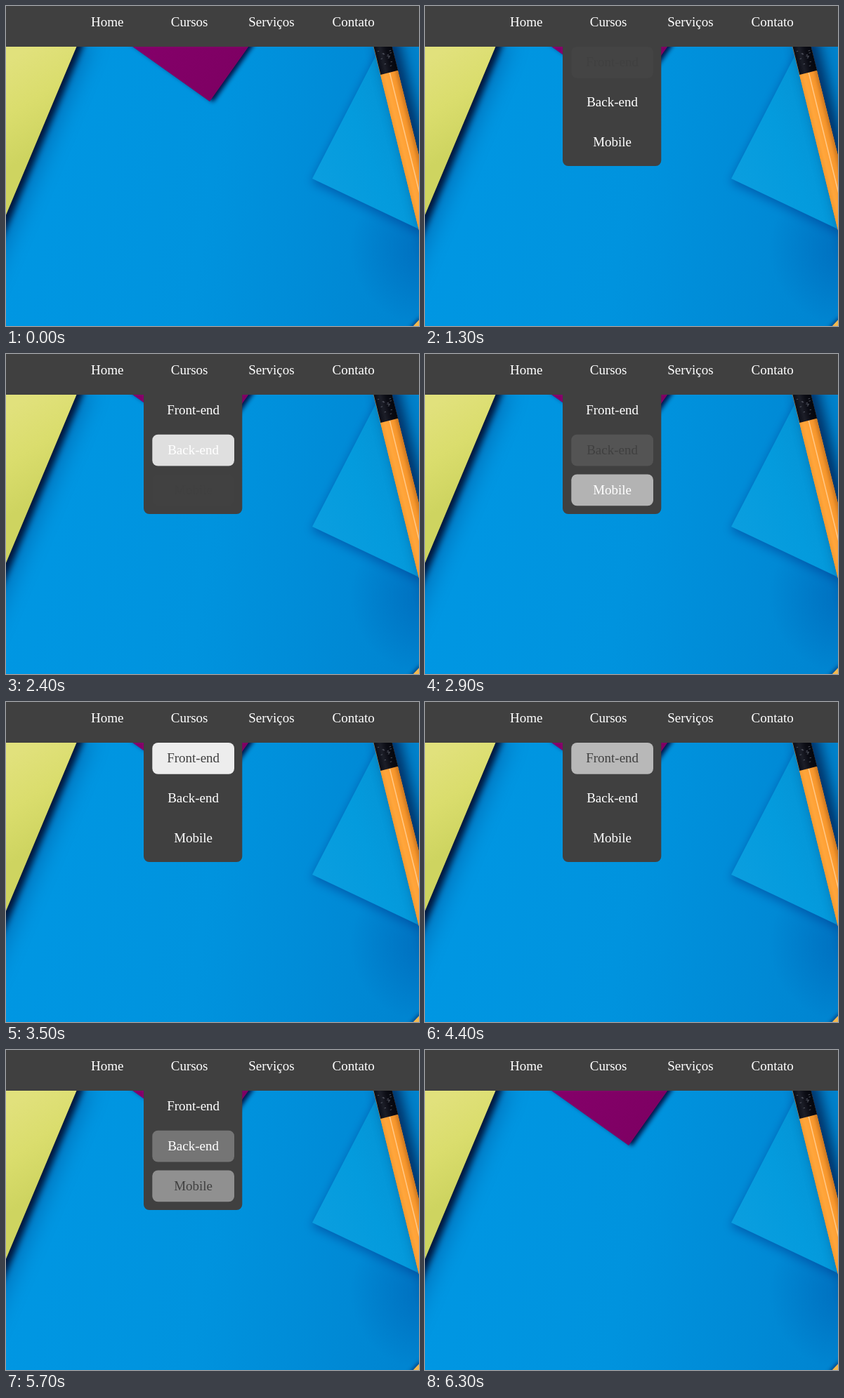
Write an HTML page with a canvas that moves like this. It is 588x456 px and loops after 8000 ms.

```html
<!DOCTYPE html>
<html lang="pt">
<head>
<meta charset="utf-8">
<title>Menu</title>
<style>
  html, body { margin: 0; width: 100%; height: 100%; overflow: hidden; background: #0090da; }
  canvas { display: block; }
</style>
</head>
<body>
<canvas id="stage" width="588" height="456"></canvas>
<script>
const W = 588, H = 456, BAR_H = 58, LOOP = 8000, STEP = 100;
const OPEN = 300, CLOSE = 6300, FADE = 500;
const DARK = 64, LIGHT = 240, BAR = '#404040';
const ROW = 56.75, ITEM_H = 44.8;
const links = ['Home', 'Cursos', 'Serviços', 'Contato'];
const items = ['Front-end', 'Back-end', 'Mobile'];
const ctx = document.getElementById('stage').getContext('2d');

// Pointer path down the menu: time in ms, height in rows
const path = [
  [1180, -1], [1345, 0], [1700, 0.2], [1900, 0.7], [2300, 1.185], [2475, 2],
  [2720, 1.9], [3180, 0], [3560, 0], [3700, 0.9], [3900, 0.5], [4170, 0.5],
  [4290, 0], [4678, 0], [5100, 0.75], [5400, 1.1], [5640, 1.85], [6150, 2.1], [6250, 2.6]
];

function pointerRow(t) {
  const i = path.findIndex(([time]) => time > t);
  if (i <= 0) return path[i ? path.length - 1 : 0][1];
  const [[t0, r0], [t1, r1]] = [path[i - 1], path[i]];
  return r0 + (r1 - r0) * (t - t0) / (t1 - t0);
}

// Alternating enter and leave times of one item
function crossings(row) {
  const times = [];
  for (let t = 0; t < CLOSE; t += 5) {
    const over = Math.abs(pointerRow(t) - row) < ITEM_H / ROW / 2;
    if (over !== (times.length % 2 === 1)) times.push(t);
  }
  return times;
}
const moves = items.map((_, row) => crossings(row));

// CSS "ease": cubic-bezier(.25, .1, .25, 1)
function ease(x) {
  if (x <= 0) return 0;
  if (x >= 1) return 1;
  const bez = (s, a, b) => 3 * (1 - s) ** 2 * s * a + 3 * (1 - s) * s * s * b + s ** 3;
  let lo = 0, hi = 1;
  for (let i = 0; i < 24; i++) {
    const mid = (lo + hi) / 2;
    if (bez(mid, 0.25, 0.25) < x) lo = mid; else hi = mid;
  }
  return bez(lo, 0.1, 1);
}

// A fade reversed midway takes proportionally less time
function hoverState(times, t) {
  let start = 0, from = 0, to = 0;
  const at = time => {
    const span = FADE * Math.abs(to - from);
    return span ? from + (to - from) * ease((time - start) / span) : to;
  };
  for (const time of times) {
    if (time > t) break;
    from = at(time);
    to = 1 - to;
    start = time;
  }
  return { level: at(t), over: to === 1 };
}

function poly(c, points, fill, shadow) {
  c.save();
  if (shadow) [c.shadowColor, c.shadowBlur, c.shadowOffsetX, c.shadowOffsetY] = shadow;
  c.beginPath();
  points.forEach(([x, y]) => c.lineTo(x, y));
  c.closePath();
  c.fillStyle = fill;
  c.fill();
  c.restore();
}

const rect = (x, y, w, h) => [[x, y], [x + w, y], [x + w, y + h], [x, y + h]];

function gradient(c, x0, y0, x1, y1, colors) {
  const g = c.createLinearGradient(x0, y0, x1, y1);
  colors.forEach((color, i) => g.addColorStop(i / (colors.length - 1), color));
  return g;
}

function drawPencil(c) {
  c.save();
  c.translate(545.5, 95);
  c.rotate(-0.243);
  poly(c, rect(-12.8, -60, 25.6, 400), '#ffa034', ['rgba(0,28,75,.9)', 20, 11, 3]);
  poly(c, rect(-12.8, 0, 25.6, 400),
    gradient(c, -13, 0, 13, 0, ['#f79a30', '#ffa63c', '#ffa034', '#f4952c', '#c8741f']));
  poly(c, rect(0, 0, 1.5, 400), '#ffc988');
  poly(c, rect(-12.5, -60, 25.5, 60),
    gradient(c, -13, 0, 13, 0, ['#0a0c16', '#1c1e28', '#0b0c14', '#05060c']));
  // Worn print on the cap
  let seed = 7;
  const rnd = () => (seed = seed * 16807 % 2147483647) / 2147483647;
  for (let i = 0; i < 14; i++) {
    poly(c, rect(rnd() * 18 - 9, -8 - rnd() * 28, 2.5, 1), 'rgba(150,155,170,.45)');
  }
  c.restore();
}

function makeDesk() {
  const desk = document.createElement('canvas');
  desk.width = W;
  desk.height = H;
  const c = desk.getContext('2d');
  poly(c, rect(0, 0, W, H), gradient(c, 0, 200, W, 300, ['#0097e3', '#0093de', '#0085d1']));
  const dim = c.createRadialGradient(600, 345, 0, 600, 345, 110);
  dim.addColorStop(0, 'rgba(0,84,168,.45)');
  dim.addColorStop(1, 'rgba(0,84,168,0)');
  poly(c, rect(0, 0, W, H), dim);

  // Light blue paper
  poly(c, [[531, 62], [436, 246], [590, 319], [640, 62]],
    gradient(c, 440, 240, 590, 180, ['#0a9edf', '#049bdd', '#0592d4']),
    ['rgba(0,66,150,.6)', 14, -1, 5]);
  poly(c, [[540, 40], [620, 40], [620, 320], [590, 305]], '#0083cd');

  // Yellow paper, with a wide and a tight shadow
  const yellow = gradient(c, 0, 80, 70, 190, ['#e1e17c', '#dadd6d', '#ced460']);
  for (const shadow of [['rgba(0,50,120,.5)', 34, 12, 6], ['rgba(0,22,60,1)', 8, 7, 4]]) {
    poly(c, [[-60, 40], [108, 40], [-60, 441]], yellow, shadow);
  }

  // Purple paper
  poly(c, [[155, 40], [358, 40], [290, 136]],
    gradient(c, 200, 57, 310, 120, ['#840069', '#7e0063']), ['rgba(0,20,70,1)', 6, 5, 1]);

  drawPencil(c);

  // Second pencil in the corner
  poly(c, [[576, 460], [592, 443], [592, 460]], '#f3b850', ['rgba(0,40,100,.7)', 5, -2, -1]);

  poly(c, rect(0, 0, W, BAR_H), BAR);
  return desk;
}

function label(text, x, y, color) {
  ctx.fillStyle = color;
  ctx.fillText(text, x, y);
}

function roundBox(x, y, w, h, radii, fill) {
  ctx.beginPath();
  ctx.roundRect(x, y, w, h, radii);
  ctx.fillStyle = fill;
  ctx.fill();
}

function drawMenu(t) {
  roundBox(196, BAR_H - 1, 140.3, 171, [0, 0, 8, 8], BAR);
  items.forEach((text, row) => {
    const y = BAR_H + row * ROW;
    const { level, over } = hoverState(moves[row], t);
    const v = Math.round(DARK + (LIGHT - DARK) * level);
    if (level > 0) roundBox(208.3, y, 116.7, ITEM_H, 8, `rgb(${v},${v},${v})`);
    label(text, 266.6, Math.round(y + 28), over ? BAR : '#fff');
  });
}

const desk = makeDesk();
ctx.font = '19px "Liberation Serif", "Times New Roman", serif';
ctx.textAlign = 'center';

function draw(t) {
  ctx.drawImage(desk, 0, 0);
  links.forEach((text, i) => label(text, 144.3 + i * 116.8, 29, '#fff'));
  if (t >= OPEN && t < CLOSE) drawMenu(t);
}

const begin = performance.now();
function tick() {
  const t = (performance.now() - begin) % LOOP;
  draw(Math.floor(t / STEP) * STEP);
  requestAnimationFrame(tick);
}
tick();
</script>
</body>
</html>
```
